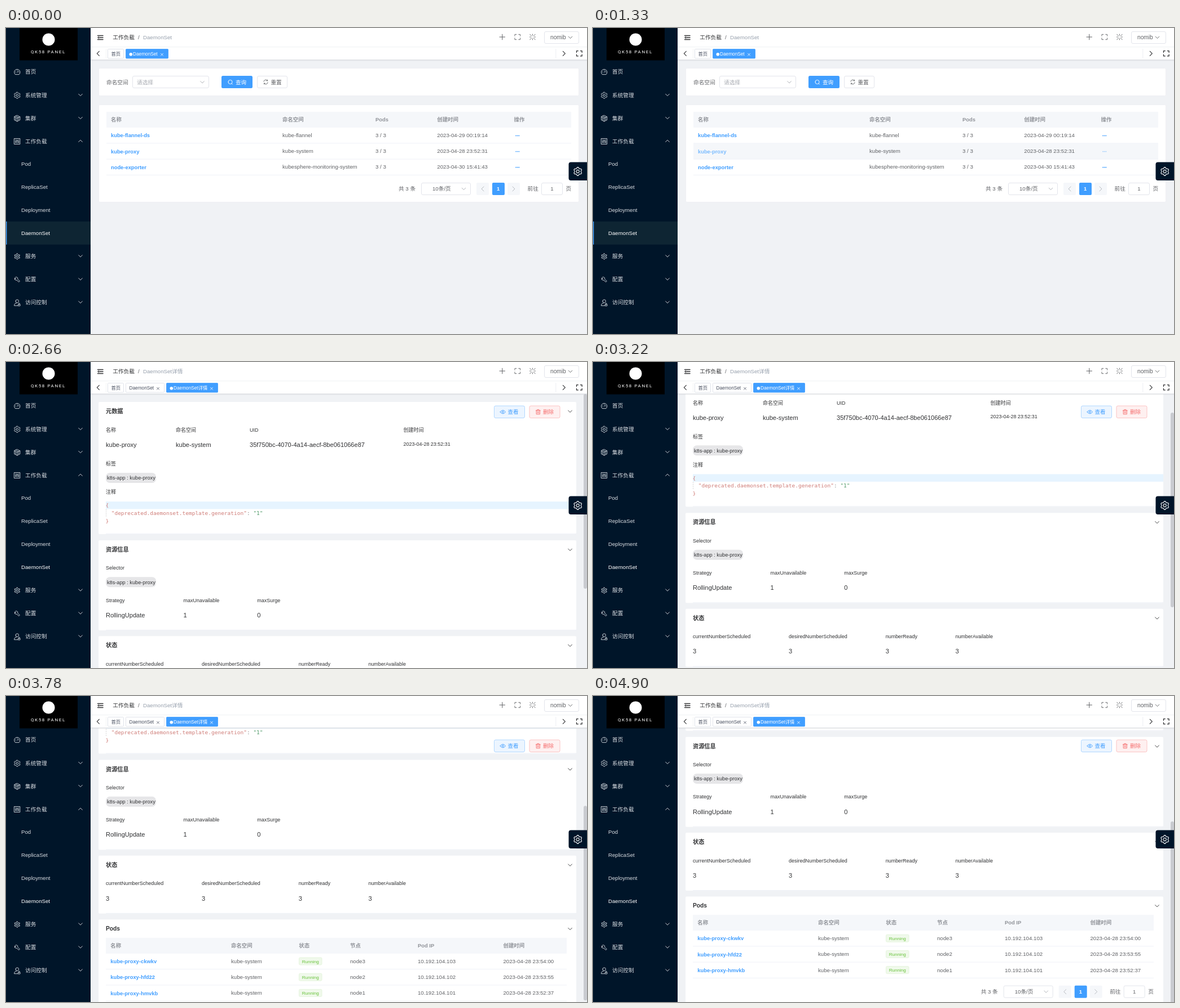
Animation, 1030 px wide and 544 px high, one loop 5320 ms. Source, as an HTML page:

```html
<!DOCTYPE html>
<html lang="zh-CN">
<head>
<meta charset="utf-8">
<title>DaemonSet</title>
<style>
html, body { margin: 0; width: 100%; height: 100%; overflow: hidden; }
svg { display: block; }
text { font-family: "Liberation Sans", "Noto Sans CJK SC", "Noto Sans CJK", sans-serif; white-space: pre; }
.mono { font-family: "DejaVu Sans Mono", monospace; }
.logo { font-family: Roboto, sans-serif; letter-spacing: 1.6px; }
</style>
</head>
<body>
<svg id="stage" width="1030" height="544" viewBox="0 0 1030 544"></svg>
<script>
const LOOP = 5320;
const BLUE = '#409eff', NAVY = '#001529', INK = '#303133', TEXT = '#606266', MUTED = '#909399', LINE = '#dcdfe6', PALE = '#f5f7fa';

// y is the vertical middle of the letters
const text = (x, y, s, fill = TEXT, size = 9.66, extra = '') =>
  `<text x="${x}" y="${y + size * 0.36}" font-size="${size}" fill="${fill}" ${extra}>${s}</text>`;
const bold = (x, y, s, fill, size = 9.4, extra = '') => text(x, y, s, fill, size, 'font-weight="bold" ' + extra);
const medium = (x, y, s, fill, size = 9.6) => text(x, y, s, fill, size, 'font-weight="500"');
const rect = (x, y, w, h, fill, r = 0, extra = '') =>
  `<rect x="${x}" y="${y}" width="${w}" height="${h}" rx="${r}" fill="${fill}" ${extra}/>`;
const box = (x, y, w, h, fill = '#fff', stroke = LINE, r = 2.5) =>
  rect(x + 0.5, y + 0.5, w - 1, h - 1, fill, r, `stroke="${stroke}" stroke-width=".8"`);
const path = (d, color, x = 0, y = 0, w = 1) =>
  `<path d="${d}" transform="translate(${x} ${y})" fill="none" stroke="${color}" stroke-width="${w}" stroke-linecap="round" stroke-linejoin="round"/>`;
const ring = r => `M${-r} 0a${r} ${r} 0 1 0 ${2 * r} 0a${r} ${r} 0 1 0 ${-2 * r} 0`;
const chevrons = { down: 'M-3.3-1.7L0 1.7L3.3-1.7', up: 'M-3.3 1.7L0-1.7L3.3 1.7', left: 'M2-4L-2 0L2 4', right: 'M-2-4L2 0L-2 4' };
const chevron = (dir, x, y, color, w = 0.9) => path(chevrons[dir], color, x, y, w);
const group = (id, body, extra = '') => `<g id="${id}" ${extra}>${body}</g>`;

function gearPath(r) {
  let d = '';
  for (let i = 0; i < 24; i++) {
    const a = (i - 0.5) * Math.PI / 12, k = i % 4 < 2 ? r : r * 0.78;
    d += (i ? 'L' : 'M') + (k * Math.sin(a)).toFixed(2) + ' ' + (-k * Math.cos(a)).toFixed(2);
  }
  return d + 'Z' + ring(r * 0.36);
}
const icons = {
  gauge: 'M-3.6 4.2A5.2 5.2 0 1 1 3.6 4.2ZM0 .8L2-2M-3.2 0h.6M2.6 0h.6M0-3.4v.6',
  gear: gearPath(5.6),
  cube: 'M0-5.3L5-2.8V2.8L0 5.3L-5 2.8V-2.8ZM-5-2.8L0-.3L5-2.8M0-.3V5.3M-2.5-4L2.5-1.6M-2.8-.8V3M2.5 0V3',
  sliders: 'M-5-5H5V5H-5ZM-2.6-3V3M0-3V3M2.6-3V3M-3.4 1h1.6M-.8-1h1.6M1.8 1.2h1.6',
  flower: 'M0-5.4L1.8-3L4.7-2.7L3.5 0L4.7 2.7L1.8 3L0 5.4L-1.8 3L-4.7 2.7L-3.5 0L-4.7-2.7L-1.8-3Z' + ring(1.8),
  wrench: 'M-4.5-1.2A2.9 2.9 0 0 1-1-4.4A2.9 2.9 0 0 1 1-.8L4.6 2.8L3 4.5L-.8 1A2.9 2.9 0 0 1-4.5-1.2L-2.7-1.6Z',
  user: 'M-2.8-2.5a2.8 2.8 0 1 0 5.6 0a2.8 2.8 0 1 0-5.6 0M-1 .6C-4 1-5.2 3-5.2 5.5H1M2 3.2H5.2V5.8H2ZM2.6 3V2a1 1 0 0 1 2 0V3',
  corners: 'M-4.8-1.8V-4.6H-2M2-4.6H4.8V-1.8M4.8 1.8V4.6H2M-2 4.6H-4.8V1.8',
  spark: 'M-1.6-1.6L-4.8-4.8M1.6-1.6L4.8-4.8M-1.6 1.6L-4.8 4.8M1.6 1.6L4.8 4.8M0-3V-5M0 3V5M-3 0H-5M3 0H5',
  search: ring(3.6) + 'M2.6 2.8L4 4.2',
  refresh: 'M-3.6-.8A3.6 3.6 0 0 1 3-2.2V-3.8M3-2.2H1.4M3.6.8A3.6 3.6 0 0 1-3 2.2V3.8M-3 2.2H-1.4',
  eye: 'M-4.6 0C-2.4-4 2.4-4 4.6 0C2.4 4-2.4 4-4.6 0Z' + ring(1.5),
  trash: 'M-4-2.6H4M-1.6-2.6V-4.1H1.6V-2.6M-3.1-2.6V4H3.1V-2.6M-1-.8V2.2M1-.8V2.2',
  close: 'M-2-2L2 2M2-2L-2 2'
};
const icon = (name, x, y, color, w = 0.9) => path(icons[name], color, x, y, w);

function pager() {
  const y = 286;
  return text(696, y, '共 3 条') +
    box(736, 275, 88, 22) + text(756, y, '10条/页') + chevron('down', 811.5, y, '#a8abb2') +
    rect(834, 275, 22, 22, PALE, 2) + chevron('left', 845, y, '#a8abb2', 0.8) +
    rect(862, 275, 22, 22, BLUE, 2) + bold(870, y, '1', '#fff') +
    rect(889, 275, 22, 22, PALE, 2) + chevron('right', 900, y, '#a8abb2', 0.8) +
    text(924.5, y, '前往') + box(949, 275, 38, 22) + text(965.3, y, '1') + text(992.5, y, '页');
}

function tableHead(x, y, w, cols, names) {
  return rect(x, y, w, 28, PALE) + names.map((n, i) => bold(cols[i], y + 14, n, MUTED, 9.4)).join('');
}
const divider = (x, y, w) => rect(x, y, w, 0.8, '#ebeef5');

function listPage() {
  const cols = [186, 490, 655, 764.3, 900.5];
  const rows = [
    ['kube-flannel-ds', 'kube-flannel', '2023-04-29 00:19:14'],
    ['kube-proxy', 'kube-system', '2023-04-28 23:52:31'],
    ['node-exporter', 'kubesphere-monitoring-system', '2023-04-30 15:41:43']
  ];
  const body = rows.map(([name, space, time], i) => {
    const y = 190.5 + i * 28.2, hot = i === 1;
    const dots = [904.2, 906.8, 909.4].map(x => `<circle cx="${x}" cy="${y + 0.9}" r=".95"/>`).join('');
    return (hot ? rect(178, 205, 824, 28, PALE, 0, 'id="hover"') : '') +
      bold(cols[0], y + 0.5, name, BLUE, 9.35, hot ? 'id="link"' : '') +
      text(cols[1], y, space) + text(cols[2], y, '3 / 3') + text(cols[3], y, time) +
      `<g fill="${BLUE}" ${hot ? 'id="dots"' : ''}>${dots}</g>` + divider(178, y + 14, 824);
  }).join('');
  return box(164, 71, 852, 50, '#fff', '#eceef2', 2) +
    text(178, 96.3, '命名空间') + box(224, 85, 136, 22) + text(232, 96.3, '请选择', '#a8abb2') + chevron('down', 348, 96.3, '#a8abb2') +
    rect(382, 85, 55, 22, BLUE, 2.5) + icon('search', 397.5, 96, '#fff') + medium(407, 96.3, '查询', '#fff') +
    box(445, 85, 54, 22) + icon('refresh', 460.5, 96, TEXT) + medium(469.5, 96.3, '重置', TEXT) +
    box(164, 136, 852, 174, '#fff', '#eceef2', 2) +
    tableHead(178, 149, 824, cols, ['名称', '命名空间', 'Pods', '创建时间', '操作']) + body + pager();
}

const card = (y, h, title) => rect(164, y, 847, h, '#fff', 2) + divider(177, y + h - 1, 834) +
  bold(177, y + 16.3, title, INK, 10.2) + chevron('down', 1000, y + 16.8, INK);
const chip = y => rect(177, y - 9, 89, 18, '#e6e6e8', 7) + text(179, y, 'k8s-app : kube-proxy', INK, 9.2);
const label = (x, y, s) => text(x, y, s, INK, 8.97);
const field = (x, y, name, value) => label(x, y, name) + text(x, y + 26.4, value, INK, 11.05);

function detailCards() {
  const cols = [185.3, 399, 519.3, 610, 730, 881.5];
  const pods = [['ckwkv', 3, '23:54:00'], ['hfd22', 2, '23:53:55'], ['hmvkb', 1, '23:52:37']];
  const podRows = pods.map(([id, n, time], i) => {
    const y = 675 + i * 28.2;
    return bold(cols[0], y + 0.3, 'kube-proxy-' + id, BLUE) + text(cols[1], y, 'kube-system') +
      box(519, y - 7, 41.5, 14, '#f0f9eb', '#e1f3d8', 2) + text(524.7, y + 0.2, 'Running', '#67c23a', 8.1) +
      text(cols[3], y, 'node' + n) + text(cols[4], y, '10.192.104.10' + n) +
      text(cols[5], y, '2023-04-28 ' + time) + divider(177, y + 13.8, 817);
  }).join('');
  const code = (x, y, s) => text(x, y, s, '#cf7c77', 9.5, 'class="mono"');
  return card(71, 235, '元数据') +
    field(177, 121, '名称', 'kube-proxy') + field(301, 121, '命名空间', 'kube-system') +
    field(432, 121, 'UID', '35f750bc-4070-4a14-aecf-8be061066e87') +
    label(704.5, 121, '创建时间') + label(704.5, 145.8, '2023-04-28 23:52:31') +
    label(177, 181, '标签') + chip(206) + label(177, 231, '注释') +
    rect(177, 248, 834, 13.4, '#e6f4ff') + code(176.6, 255, '{') +
    code(186.7, 268.5, '"deprecated.daemonset.template.generation"<tspan fill="#888">:</tspan> <tspan fill="#4f9a68">"1"</tspan>') +
    code(176.6, 282.3, '}') + '<path d="M177.5 262v13" stroke="#ccc" stroke-dasharray="2 1.5" stroke-width=".8"/>' +
    card(317, 160, '资源信息') + label(177, 366, 'Selector') + chip(391.3) +
    field(177, 423.5, 'Strategy', 'RollingUpdate') + field(314.5, 423.5, 'maxUnavailable', 1) + field(445.3, 423.5, 'maxSurge', 0) +
    card(487.3, 103, '状态') +
    [[177, 'currentNumberScheduled'], [347, 'desiredNumberScheduled'], [518.7, 'numberReady'], [642.4, 'numberAvailable']]
      .map(([x, name]) => field(x, 536.7, name, 3)).join('') +
    card(600.7, 240, 'Pods') +
    tableHead(177, 633.3, 817, cols, ['名称', '命名空间', '状态', '节点', 'Pod IP', '创建时间']) + podRows +
    `<g transform="translate(-8.3 484)">${pager()}</g>`;
}

function actions() {
  const button = (x, fill, edge, color, name, s) =>
    box(x, 77.5, 55, 22.5, fill, edge) + icon(name, x + 15.8, 88.8, color) + medium(x + 24.5, 89, s, color);
  return button(865, '#ecf5ff', '#a0cfff', BLUE, 'eye', '查看') +
    button(927.5, '#fef0f0', '#fab6b6', '#f56c6c', 'trash', '删除');
}

function sidebar() {
  const menu = [
    ['gauge', '首页', 78], ['gear', '系统管理', 119.5, 'down'], ['cube', '集群', 160.5, 'down'], ['sliders', '工作负载', 201.3, 'up'],
    ['flower', '服务', 406, 'down'], ['wrench', '配置', 447, 'down'], ['user', '访问控制', 488, 'down']
  ];
  const fg = '#d9dde2';
  return rect(0, 0, 150, 544, NAVY) + rect(24, 0, 103, 57.5, '#000') +
    '<circle cx="75.5" cy="20.5" r="11" fill="#fff"/>' +
    text(44, 42.5, 'QK58 PANEL', '#fff', 8, 'class="logo"') +
    group('active', rect(0, 344, 150, 41, '#0e2533') + rect(0, 344, 1.4, 41, BLUE)) +
    menu.map(([name, s, y, dir]) => icon(name, 19.8, y + 0.2, fg) + text(34, y, s, fg) + (dir ? chevron(dir, 132, y - 0.5, fg) : '')).join('') +
    ['Pod', 'ReplicaSet', 'Deployment', 'DaemonSet'].map((s, i) => text(27, 241.7 + i * 41, s, i < 3 ? fg : '#fff')).join('');
}

function tab(x, w, s, active) {
  const fg = active ? '#fff' : '#495060';
  return box(x, 37, w, 17.5, active ? BLUE : '#fff', active ? BLUE : '#d8dce5', 1) +
    (active ? `<circle cx="${x + 9.3}" cy="46.8" r="2.8" fill="#fff"/>` : '') +
    text(x + (active ? 13 : 6.5), 46.3, s, fg, 8.28) + (s === '首页' ? '' : icon('close', x + w - 11.5, 47.2, fg, 0.8));
}

function header() {
  const crumb = s => text(243, 17, s, '#97a0ad');
  return rect(150, 0, 880, 57, '#fff') + rect(150, 33.4, 880, 0.8, '#eceef1') +
    rect(150, 56.3, 880, 1, '#d3d6dc') + rect(150, 57.3, 880, 1.2, '#000', 0, 'opacity=".04"') +
    path('M162.5 13.6h9.5M166 17h6M162.5 20.4h9.5', INK, 0, 0, 1.5) + path('M164.4 15.6L162.4 17L164.4 18.4Z', INK) +
    text(189.3, 17, '工作负载', INK) + text(234, 17, '/', TEXT) +
    path('M875 16h9.6M879.8 11.2v9.6', TEXT) + icon('corners', 906.8, 16, TEXT) + icon('spark', 933.5, 16, TEXT) +
    box(954, 6, 62, 22) + text(965, 16.8, 'nomib', TEXT, 10.2) + chevron('down', 1000.5, 16.8, TEXT) +
    chevron('left', 163.3, 45.3, INK, 1.1) + rect(177, 37, 0.7, 17, '#eee') +
    rect(974.5, 37, 0.7, 17, '#e4e7ed') + chevron('right', 989.3, 45.3, INK, 1.1) + icon('corners', 1016.3, 45.3, INK, 1.3) +
    tab(180, 29, '首页') +
    group('tabsA', crumb('DaemonSet') + tab(212, 76, 'DaemonSet', true)) +
    group('tabsB', crumb('DaemonSet详情') + tab(212, 69, 'DaemonSet') + tab(284, 92, 'DaemonSet详情', true));
}

const $ = id => document.getElementById(id);
$('stage').innerHTML = rect(150, 0, 880, 544, '#f0f2f5') +
  group('list', listPage()) +
  group('detail', group('cards', detailCards()) + actions() + rect(1024, 57, 6, 346, '#c9cbd0', 3, 'id="thumb"')) +
  sidebar() + header() + rect(997.5, 238.5, 40, 32.5, NAVY, 4) + path(gearPath(7.4), '#fff', 1013.7, 255, 1.1);

const ramp = (t, a, b) => Math.min(1, Math.max(0, (t - a) / (b - a)));
const ease = p => p * p * (3 - 2 * p);

// time, scroll offset, speed
const scrollKeys = [[3010, 0, 0.12], [3220, 48.4, 0.25], [3500, 118.5, 0.27], [3990, 244.3, 0.08]];
function scrollAt(t) {
  if (t <= 3010) return 0;
  const i = scrollKeys.findIndex(k => t < k[0]);
  if (i < 0) return 244.3;
  const [t0, y0, v0] = scrollKeys[i - 1], [t1, y1, v1] = scrollKeys[i];
  const d = t1 - t0, p = (t - t0) / d, q = 1 - p;
  return y0 + (y1 - y0) * ease(p) + d * p * q * (v0 * q - v1 * p);
}

function draw() {
  const t = performance.now() % LOOP;
  const opened = t >= 2030;
  const hover = ease(ramp(t, 230, 560)), leave = ease(ramp(t, 1980, 2240)), enter = ease(ramp(t, 2310, 2660));
  $('hover').setAttribute('opacity', hover);
  $('link').setAttribute('fill', t >= 1330 ? '#79bbff' : BLUE);
  $('dots').setAttribute('opacity', 1 - 0.5 * hover * (1 - ramp(t, 1750, 1890)));
  $('list').setAttribute('opacity', opened ? 1 - leave : 1);
  $('list').setAttribute('transform', `translate(${opened ? 30 * leave : 0} 0)`);
  $('detail').setAttribute('opacity', enter);
  $('active').setAttribute('opacity', opened ? 0 : 1);
  $('tabsA').setAttribute('visibility', opened ? 'hidden' : 'visible');
  $('tabsB').setAttribute('visibility', opened ? 'visible' : 'hidden');
  const y = scrollAt(t);
  $('cards').setAttribute('transform', `translate(0 ${-y})`);
  $('thumb').setAttribute('transform', `translate(0 ${y * 0.68})`);
  requestAnimationFrame(draw);
}
draw();
</script>
</body>
</html>
```
